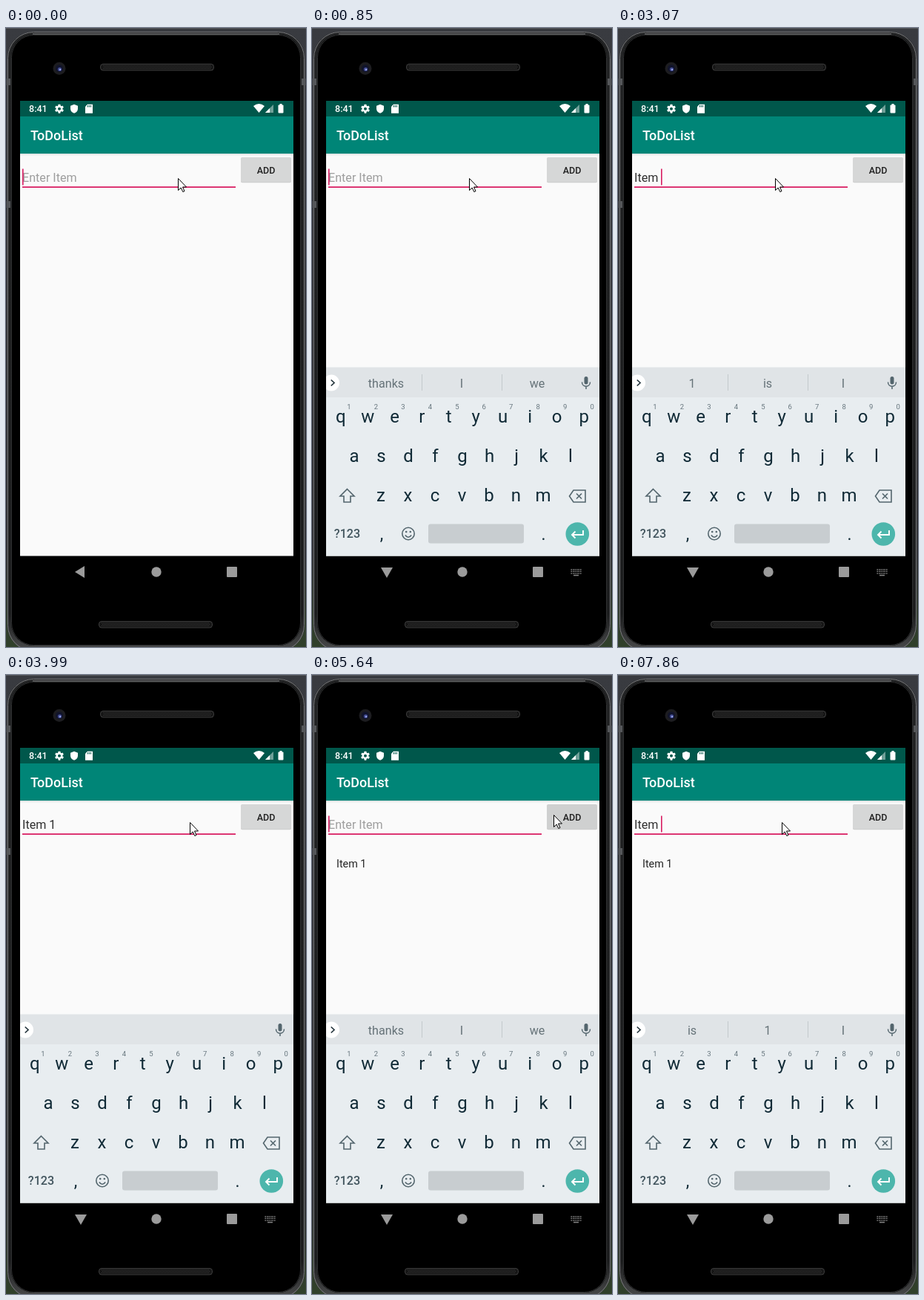
Recreate the animation shown at these times as an HTML page with a canvas. Size 405 px wide and 833 px high, loop 8000 ms.

```html
<!DOCTYPE html>
<html lang="en">
<head>
<meta charset="utf-8">
<title>To-do list demo</title>
<style>
  html, body { margin: 0; width: 100%; height: 100%; overflow: hidden; background: #000; }
  canvas { display: block; width: 405px; height: 833px; }
</style>
</head>
<body>
<canvas id="stage"></canvas>
<script>
const LOOP = 8000;
const SP = 369 / 411.4; // stage pixels per Android sp
const PINK = '#d81b60', KEY = '#102a36', ICON = '#53656d', NAV = '#9b9b9b';
const canvas = document.getElementById('stage');
const ctx = canvas.getContext('2d');
const ratio = window.devicePixelRatio || 1;
canvas.width = 405 * ratio;
canvas.height = 833 * ratio;
ctx.scale(ratio, ratio);

// Tracks: [start in ms, value...]; each value holds until the next entry.
const pointerTrack = [
  [0, 232, 202], [150, 212, 202], [3870, 222, 201], [3990, 248, 198], [4110, 276, 193],
  [4270, 324, 186], [4410, 325, 187], [4530, 326, 188], [5760, 234, 195], [5910, 221, 198]
];
const caretTrack = [
  [0, 1], [570, 0], [850, 1], [1400, 0], [1550, 1], [2110, 0], [2390, 1], [3870, 0],
  [4270, 1], [4810, 0], [5370, 1], [5910, 0], [6310, 1], [6870, 0], [6990, 1]
];
const inputTrack = [
  [0, ''], [1550, 'I'], [2390, 'It'], [2670, 'Item'], [3070, 'Item '], [3350, 'Item 1'],
  [5370, ''], [6990, 'I'], [7270, 'It'], [7550, 'Item'], [7860, 'Item ']
];
const START = ['thanks', 'I', 'we'], AFTER_I = ['I', "I'm", 'It'],
      AFTER_IT = ['It', "It's", 'Its'], AFTER_ITEM = ['Item', 'Items', 'Itemized'];
const hintTrack = [
  [0, START], [1550, AFTER_I], [2390, AFTER_IT], [2670, AFTER_ITEM], [3070, ['1', 'is', 'I']],
  [3350, []], [5520, START], [6990, AFTER_I], [7270, AFTER_IT], [7550, AFTER_ITEM],
  [7860, ['is', '1', 'I']]
];
const rippleTrack = [[0, 0], [5370, 42], [5520, 75], [5760, 0]];
const valueAt = (track, t) => track.findLast(entry => entry[0] <= t).slice(1);

function rect(x, y, w, h, color, radius = 0) {
  ctx.fillStyle = color;
  ctx.beginPath();
  ctx.roundRect(x, y, w, h, radius);
  ctx.fill();
}
function circle(x, y, r, color) {
  ctx.fillStyle = color;
  ctx.beginPath();
  ctx.arc(x, y, r, 0, 2 * Math.PI);
  ctx.fill();
}
function text(value, x, y, size, color, align = 'left', weight = 400) {
  ctx.font = `${weight} ${size}px Roboto, sans-serif`;
  ctx.textAlign = align;
  ctx.fillStyle = color;
  ctx.fillText(value, x, y);
}
function shape(data, color, x = 0, y = 0) {
  ctx.save();
  ctx.translate(x, y);
  ctx.fillStyle = color;
  ctx.fill(new Path2D(data));
  ctx.restore();
}
function line(data, color, width, x = 0, y = 0) {
  ctx.save();
  ctx.translate(x, y);
  ctx.strokeStyle = color;
  ctx.lineWidth = width;
  ctx.stroke(new Path2D(data));
  ctx.restore();
}
function outline(x, y, w, h, radius, color, width) {
  ctx.strokeStyle = color;
  ctx.lineWidth = width;
  ctx.beginPath();
  ctx.roundRect(x, y, w, h, radius);
  ctx.stroke();
}
function verticalGradient(top, bottom, ...stops) {
  const gradient = ctx.createLinearGradient(0, top, 0, bottom);
  for (const [offset, color] of stops) gradient.addColorStop(offset, color);
  return gradient;
}

function drawSpeaker(x, y) {
  rect(x, y, 154, 9.5, '#3c3c3c', 4.5);
  rect(x + 1, y + 1, 152, 7.5, '#161616', 4);
  for (let row = 0; row < 3; row++)
    for (let i = 0; i < 73; i++)
      rect(x + 4 + i * 2 + row % 2, y + 2 + row * 2, 1, 1, '#393939');
}

function drawPhone() {
  rect(0, 0, 405, 833, verticalGradient(0, 833, [0, '#393b40'], [.85, '#303135'], [1, '#30402a']));
  rect(0, 0, 405, 1, '#55575b');
  rect(2, 5, 401, 834, verticalGradient(5, 839, [0, '#232425'], [.94, '#1d1e1f'], [1, '#4a4b4c']), 35);
  outline(2.5, 5.5, 400, 833, 35, '#77787a', 1);
  rect(7, 9, 391, 822, '#000', 30);
  outline(7.5, 9.5, 390, 821, 30, '#2e2f30', 1);
  line('M36 8H369', '#8a8b8c', 1);
  for (const [x, y] of [[1, 68], [399, 68], [1, 233]]) rect(x, y, 5, 9, '#55575a');
  drawSpeaker(127, 48);
  drawSpeaker(125, 798);
  circle(72, 54.5, 8.5, '#1d1d20');
  circle(72, 54.5, 5, '#11142b');
  circle(72.5, 55.5, 2.6, '#414b91');
  circle(73, 56, 1.2, '#9ba6e0');
}

function drawStatusBar() {
  rect(19, 98, 369, 21, '#00574b');
  text('8:41', 31, 113, 14 * SP, '#fff', 'left', 500);
  for (let i = 0; i < 6; i++) {
    ctx.save();
    ctx.translate(72, 108.7);
    ctx.rotate(i * Math.PI / 3);
    rect(-1.5, -6, 3, 4, '#fff', .6);
    ctx.restore();
  }
  circle(72, 108.7, 4.4, '#fff');
  circle(72, 108.7, 2, '#00574b');
  shape('M0-6L5-4V0C5 3 3 5 0 6C-3 5-5 3-5 0V-4Z', '#fff', 92, 108.7);
  shape('M-2-6H5V6H-5V-3Z', '#fff', 112, 108.7);
  for (const x of [110, 112, 114]) rect(x, 104, 1, 2.5, '#00574b');
  shape('M334 105Q341.5 99 349 105L341.5 114Z', '#fff');
  shape('M361 103V114H350Z', '#6f9f98');
  shape('M356 108V114H350Z', '#fff');
  rect(367.5, 103.5, 7, 11, '#fff', 1);
  rect(369.5, 102, 3, 2, '#fff');
}

function drawApp(t) {
  rect(19, 169, 369, 541.5, '#fafafa');
  rect(19, 169, 369, 3, verticalGradient(169, 172, [0, '#d8dddd'], [1, '#fafafa']));
  drawStatusBar();
  rect(19, 119, 369, 50, '#008577');
  text('ToDoList', 33, 151, 20 * SP, '#fff', 'left', 500);

  const [input] = valueAt(inputTrack, t), [caret] = valueAt(caretTrack, t);
  if (input) text(input, 22, 207, 18 * SP, '#303030');
  else text('Enter Item', 22, 207, 18 * SP, '#9e9e9e');
  ctx.font = `400 ${18 * SP}px Roboto, sans-serif`;
  const width = ctx.measureText(input).width;
  if (/^\w+$/.test(input)) rect(22, 208, width, 1, '#303030');
  rect(22, 213.3, 288, 1.6, PINK);
  if (caret) rect(Math.floor(22 + width), 189.5, 1.6, 22, PINK);

  rect(317, 174.5, 68, 33.8, '#c9caca', 2);
  rect(317, 174, 68, 33.5, '#d6d7d7', 2);
  const [ripple] = valueAt(rippleTrack, t);
  if (ripple) {
    ctx.save();
    ctx.beginPath();
    ctx.roundRect(317, 174, 68, 33.5, 2);
    ctx.clip();
    circle(327, 190, ripple, 'rgba(0,0,0,.03)');
    ctx.restore();
  }
  text('ADD', 351, 195.7, 14 * SP, '#222', 'center', 500);
  if (t >= 5370) text('Item 1', 33, 259, 16 * SP, '#242424');
}

function drawKeyRow(letters, firstX, baseline) {
  [...letters].forEach((letter, i) => text(letter, firstX + i * 36.5, baseline, 24, KEY, 'center'));
}

function drawKeyboard(t) {
  rect(19, 456, 369, 1, '#eef0f1');
  rect(19, 457, 369, 40, '#e0e4e7');
  rect(19, 497, 369, 213.5, '#e8edf0');

  ctx.save();
  ctx.beginPath();
  ctx.rect(19, 457, 369, 40);
  ctx.clip();
  circle(26, 477.5, 11, '#fff');
  ctx.restore();
  line('M25.7 473.5L30 477.5L25.7 481.5', '#26363e', 1.7);

  const [hints] = valueAt(hintTrack, t);
  hints.forEach((hint, i) => text(hint, 100 + i * 102, 483.5, 18 * SP, '#657278', 'center'));
  if (hints.length) for (const x of [148, 256]) rect(x, 466, 1, 22, '#c4cacd');

  rect(367.5, 469, 5, 10.5, ICON, 2.5);
  line('M364.5 476.5C364.5 484 375.5 484 375.5 476.5M370 482V486', ICON, 1.5);

  drawKeyRow('qwertyuiop', 38.7, 531);
  [...'1234567890'].forEach((digit, i) => text(digit, 50 + i * 36.45, 513, 9.5, '#66757d', 'center'));
  drawKeyRow('asdfghjkl', 57, 584);
  drawKeyRow('zxcvbnm', 93, 636.5);

  line('M47.5 620.5L57 630H52V638H43V630H38Z', ICON, 1.6);
  line('M353 622H369V638H353L347.5 630ZM357 626.5L364 633.5M364 626.5L357 633.5', ICON, 1.6);

  text('?123', 47.5, 686, 18 * SP, '#42555e', 'center', 500);
  text(',', 94, 689, 23, KEY, 'center');
  text('.', 312.5, 689, 23, KEY, 'center');
  line('M138.2 680.5A8.2 8.2 0 1 1 121.8 680.5A8.2 8.2 0 1 1 138.2 680.5M125.8 682.5Q130 688 134.2 682.5', ICON, 1.6);
  circle(127.2, 678, 1.3, ICON);
  circle(132.8, 678, 1.3, ICON);
  rect(157, 667.5, 129, 26, '#c8cdd0', 3);
  circle(358.3, 681, 15.8, '#4db6ac');
  line('M366 676V682H351.5M355.5 677.5L351 682L355.5 686.5', '#fff', 1.9);
}

function drawNavigation(open) {
  shape(open ? 'M93 726H109L101 740Z' : 'M93 732L106 724V740Z', NAV);
  circle(203, 732, 6.7, NAV);
  rect(298, 725, 14, 14, NAV, 1);
  if (!open) return;
  for (let row = 0; row < 3; row++)
    for (let i = 0; i < 6; i++)
      rect(349.5 + i * 2.5, 728 + row * 2.6, 1.5, 1.5, '#858585');
  rect(353, 735.8, 7, 1.5, '#858585');
}

function drawPointer(t) {
  const arrow = 'M.5.5V16.5L4.2 13L6.8 18.5L9 17.5L6.5 12H11.5Z';
  const [x, y] = valueAt(pointerTrack, t);
  shape(arrow, '#fff', x, y);
  line(arrow, '#000', 1, x, y);
}

function draw(now) {
  const t = now % LOOP;
  drawPhone();
  drawApp(t);
  if (t >= 850) drawKeyboard(t);
  drawNavigation(t >= 420);
  drawPointer(t);
  requestAnimationFrame(tick);
}

const started = performance.now();
function tick() {
  draw(Math.max(0, performance.now() - started));
}
tick();
</script>
</body>
</html>
```
